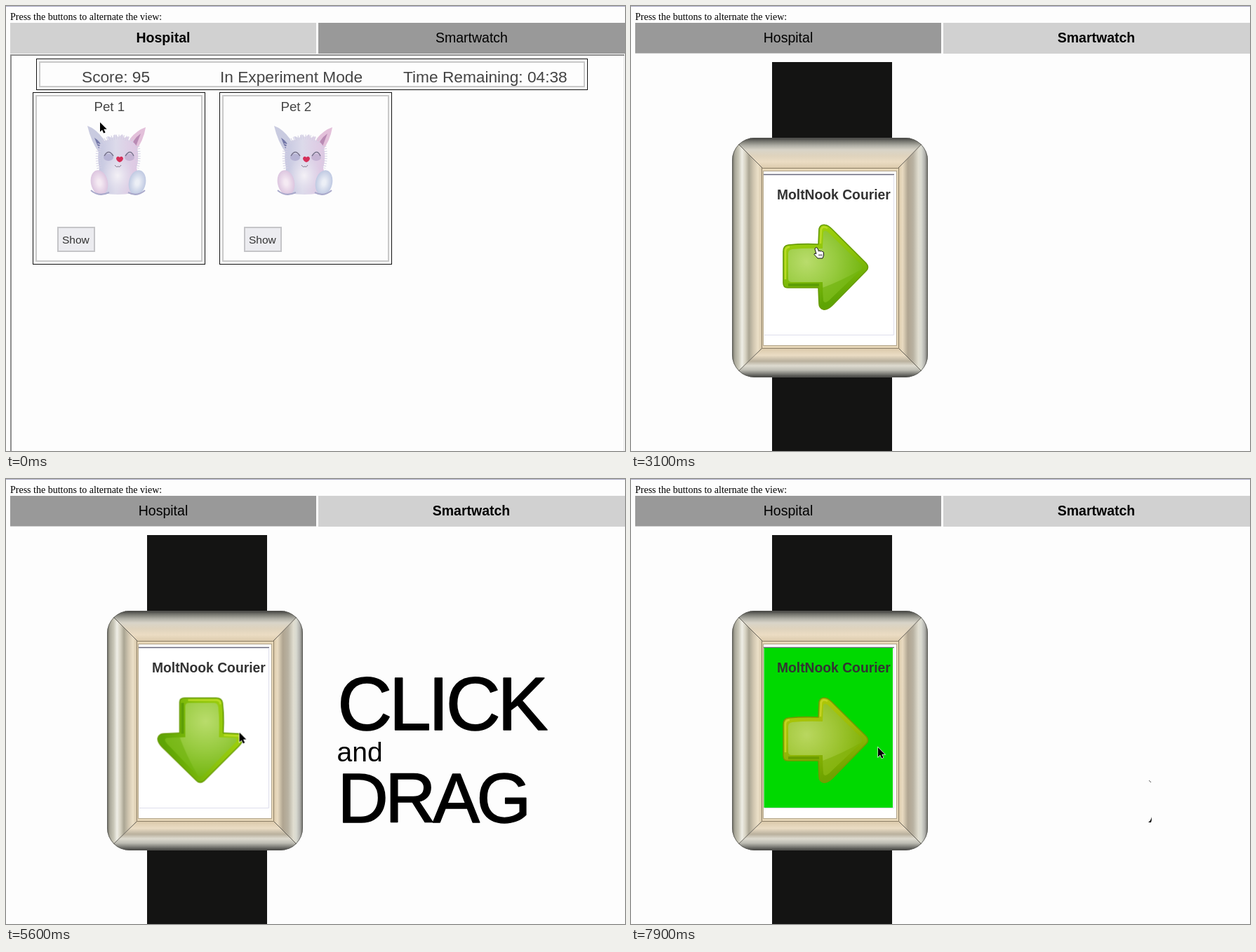
Animation of 882 by 635 pixels, one loop 8 s. Source, as an HTML page:

```html
<!DOCTYPE html>
<html lang="en">
<head>
<meta charset="utf-8">
<title>Pet hospital and smartwatch</title>
<style>
html, body { margin: 0; width: 100%; height: 100%; overflow: hidden; background: #fdfdfd; }
svg { display: block; width: 882px; height: 635px; }
text { font-family: "Liberation Sans", Arial, sans-serif; }
.intro { font: 14px "Liberation Serif", Times, serif; }
.tab { font-size: 19.5px; text-anchor: middle; }
.on { font-weight: bold; }
.info { font-size: 22.7px; fill: #444; }
.name { font-size: 18.7px; fill: #444; }
.show { font-size: 15.5px; fill: #333; }
.title { font-size: 19.3px; font-weight: bold; fill: #333; }
.big { stroke: #000; stroke-width: 1.5; stroke-linejoin: round; }
.click { font-size: 108px; letter-spacing: -4.5px; }
.drag { font-size: 100px; letter-spacing: -4.4px; }
.and { font-size: 39px; stroke: none; }

/* Hard changes */
.hospital, .watch, .t38, .t37, .t36, .big, .specks, .flash, .hand, .pointer, .arrow {
  animation: 8s step-end infinite;
}
.hospital { animation-name: hospital; }
.watch { animation-name: watch; }
.t38 { animation-name: t38; }
.t37 { animation-name: t37; }
.t36 { animation-name: t36; }
.big { animation-name: big; }
.specks { animation-name: specks; }
.flash { animation-name: flash; }
.hand { animation-name: hand; }
.pointer { animation-name: pointer; }
.arrow { animation-name: arrow; transform-origin: 277px 372.5px; }
@keyframes hospital { 0% { visibility: visible } 27.5%, 100% { visibility: hidden } }
@keyframes watch { 0% { visibility: hidden } 27.5%, 100% { visibility: visible } }
@keyframes t38 { 0% { opacity: 1 } 8.75%, 100% { opacity: 0 } }
@keyframes t37 { 0% { opacity: 0 } 8.75% { opacity: 1 } 21.25%, 100% { opacity: 0 } }
@keyframes t36 { 0% { opacity: 0 } 21.25%, 100% { opacity: 1 } }
@keyframes big { 0% { opacity: 0 } 50% { opacity: 1 } 95%, 100% { opacity: 0 } }
@keyframes specks { 0% { opacity: 0 } 95%, 100% { opacity: 1 } }
@keyframes flash {
  0%, 67.5%, 85% { opacity: 0 }
  65%, 82.5%, 97.5%, 100% { opacity: 1 }
}
@keyframes hand { 0% { opacity: 0 } 36.25% { opacity: 1 } 57.5%, 100% { opacity: 0 } }
@keyframes pointer { 0% { opacity: 1 } 36.25% { opacity: 0 } 57.5%, 100% { opacity: 1 } }
@keyframes arrow {
  0%, 85% { transform: none; filter: none }
  65% { transform: none; filter: hue-rotate(-12deg) opacity(.9) }
  67.5% { transform: rotate(90deg); filter: none }
  82.5% { transform: rotate(90deg); filter: hue-rotate(-12deg) opacity(.9) }
  97.5%, 100% { transform: none; filter: hue-rotate(-12deg) opacity(.9) }
}

/* Mouse path, sampled every 100 ms */
.cursor { animation: mouse 8s infinite; }
@keyframes mouse {
  0% { transform: translate(134px, 166px); animation-timing-function: step-end }
  3.75% { transform: translate(134px, 166px); animation-timing-function: steps(15) }
  22.5% { transform: translate(501px, 51px); animation-timing-function: steps(3) }
  26.25% { transform: translate(580px, 50px); animation-timing-function: step-end }
  27.5% { transform: translate(580px, 50px); animation-timing-function: steps(8) }
  37.5% { transform: translate(265px, 345px); animation-timing-function: step-end }
  57.5% { transform: translate(265px, 345px); animation-timing-function: steps(3) }
  61.25% { transform: translate(274px, 362px); animation-timing-function: steps(3) }
  65% { transform: translate(345px, 366px); animation-timing-function: step-end }
  68.75% { transform: translate(345px, 366px); animation-timing-function: steps(5) }
  75% { transform: translate(283px, 345px); animation-timing-function: step-end }
  77.5% { transform: translate(283px, 345px); animation-timing-function: steps(3) }
  81.25% { transform: translate(290px, 415px); animation-timing-function: steps(1) }
  82.5% { transform: translate(291px, 424px); animation-timing-function: steps(5) }
  88.75% { transform: translate(285px, 400px); animation-timing-function: steps(1) }
  90% { transform: translate(282px, 394px); animation-timing-function: steps(6) }
  97.5% { transform: translate(350px, 383px); animation-timing-function: steps(1) }
  98.75%, 100% { transform: translate(352px, 383px) }
}
</style>
</head>
<body>
<svg viewBox="0 0 882 635" xmlns="http://www.w3.org/2000/svg">
  <defs>
    <linearGradient id="fur">
      <stop offset="0" stop-color="#c3c5df"/><stop offset=".45" stop-color="#dcdaea"/><stop offset="1" stop-color="#dfc6e2"/>
    </linearGradient>
    <radialGradient id="belly">
      <stop offset="0" stop-color="#f4f1f6"/><stop offset="1" stop-color="#e2deed" stop-opacity="0"/>
    </radialGradient>
    <radialGradient id="footL"><stop offset=".2" stop-color="#f5eaf3"/><stop offset="1" stop-color="#dcc5df"/></radialGradient>
    <radialGradient id="footR"><stop offset=".2" stop-color="#eceff6"/><stop offset="1" stop-color="#bfc9e2"/></radialGradient>

    <linearGradient id="sideL">
      <stop offset="0" stop-color="#62625a"/><stop offset=".09" stop-color="#a9a799"/><stop offset=".22" stop-color="#c9c7b8"/>
      <stop offset=".33" stop-color="#efeee6"/><stop offset=".45" stop-color="#d5d0c0"/><stop offset=".56" stop-color="#aaa593"/>
      <stop offset=".72" stop-color="#d3c8b2"/><stop offset=".86" stop-color="#ece0c8"/><stop offset="1" stop-color="#d4c4a6"/>
    </linearGradient>
    <linearGradient id="sideR">
      <stop offset="0" stop-color="#d9c7a7"/><stop offset=".14" stop-color="#e9dbc1"/><stop offset=".32" stop-color="#b0a591"/>
      <stop offset=".5" stop-color="#b8b1a1"/><stop offset=".68" stop-color="#e0ddd0"/><stop offset=".78" stop-color="#d8d9d0"/>
      <stop offset=".9" stop-color="#b0b0ac"/><stop offset="1" stop-color="#666660"/>
    </linearGradient>
    <linearGradient id="sideT" x2="0" y2="1">
      <stop offset="0" stop-color="#3c3c3a"/><stop offset=".12" stop-color="#777770"/><stop offset=".26" stop-color="#b0afa6"/>
      <stop offset=".4" stop-color="#d8d4c8"/><stop offset=".6" stop-color="#dfd3bd"/><stop offset=".8" stop-color="#ebdcc3"/>
      <stop offset="1" stop-color="#dccbad"/>
    </linearGradient>
    <linearGradient id="sideB" x2="0" y2="1">
      <stop offset="0" stop-color="#dac8a9"/><stop offset=".25" stop-color="#eadcc4"/><stop offset=".45" stop-color="#b9b09d"/>
      <stop offset=".6" stop-color="#dedbd0"/><stop offset=".75" stop-color="#bdbcb3"/><stop offset=".88" stop-color="#7c7c76"/>
      <stop offset="1" stop-color="#3c3c3a"/>
    </linearGradient>
    <clipPath id="case"><rect x="144" y="188" width="279" height="342" rx="32"/></clipPath>

    <linearGradient id="rim" x2=".3" y2="1">
      <stop offset="0" stop-color="#a4d40a"/><stop offset=".5" stop-color="#8cc40c"/><stop offset="1" stop-color="#5ea404"/>
    </linearGradient>
    <radialGradient id="face" gradientUnits="userSpaceOnUse" cx="250" cy="365" r="82">
      <stop offset="0" stop-color="#b9dc6c"/><stop offset=".5" stop-color="#98cb40"/><stop offset="1" stop-color="#74b610"/>
    </radialGradient>

    <g id="pet">
      <rect x="38.5" y="123.5" width="245" height="245" fill="none" stroke="#111"/>
      <rect x="43" y="128" width="236" height="236" fill="none" stroke="#c9c9c9" stroke-width="2"/>
      <path d="M116 171Q128 175 139 190L145 205 133 210Q121 193 116 171Z" fill="#c9cbe0"/>
      <path d="M126 188Q136 194 138 205L132 203Z" fill="#7478a8"/>
      <path d="M199 173Q187 177 177 189L171 204 183 209Q196 193 199 173Z" fill="#e3c0da"/>
      <path d="M192 182Q179 191 178 205L184 203Z" fill="#b98bb4"/>
      <path d="M134 197Q140 191 146 191L144 186 152 188 155 183 160 187 166 183 168 188 175 186 174 191Q183 193 187 202 190 217 186 231 194 260 181 267 159 271 138 267 125 260 133 232 129 212 134 197Z" fill="url(#fur)"/>
      <path d="M134 197Q129 212 133 232M187 200Q190 217 186 231M138 194Q160 180 182 194" fill="none" stroke="#d3cfe3" stroke-width="7" stroke-dasharray="1 2.4"/>
      <ellipse cx="159" cy="242" rx="23" ry="27" fill="url(#belly)"/>
      <ellipse cx="133" cy="252" rx="12" ry="18" fill="url(#footL)" transform="rotate(-12 133 252)"/>
      <ellipse cx="187" cy="252" rx="12" ry="18" fill="url(#footR)" transform="rotate(12 187 252)"/>
      <path d="M121 263Q132 273 147 266M174 266Q187 273 198 263" fill="none" stroke="#a9a9cb" stroke-width="2"/>
      <ellipse cx="146" cy="216" rx="7" ry="5" fill="#b6b3d4"/>
      <ellipse cx="176" cy="216" rx="7" ry="5" fill="#c6b4d4"/>
      <path d="M140 214Q146 203 153 214M170 214Q177 203 182 214" fill="none" stroke="#77738c" stroke-width="1.4"/>
      <path d="M157 217Q159 213 162 216 165 213 167 217 167 221 162 223 157 221 157 217Z" fill="#d52f59"/>
      <path d="M155 227Q157 231 160 229 162 231 164 227" fill="none" stroke="#85798e"/>
      <rect x="74" y="316" width="52" height="34" fill="#ececf0" stroke="#c5c5c8" stroke-width="2"/>
      <text class="show" x="80" y="339">Show</text>
    </g>
  </defs>

  <rect width="882" height="635" fill="#fdfdfd"/>
  <path d="M0 .5H882" stroke="#a8a8c2"/>
  <text class="intro" x="6" y="20">Press the buttons to alternate the view:</text>

  <g class="hospital">
    <path d="M6 24H442V68H6Z" fill="#d1d1d1"/>
    <path d="M445 24H882V68H445Z" fill="#999"/>
    <text class="tab on" x="224" y="52">Hospital</text>
    <text class="tab" x="663.5" y="52">Smartwatch</text>
    <path d="M7 635V70H881" fill="none" stroke="#8f8f8f" stroke-width="2"/>
    <path d="M880.5 71V635" stroke="#e4e4e4"/>
    <rect x="43.5" y="75.5" width="785" height="44" fill="none" stroke="#111"/>
    <rect x="48" y="80" width="776" height="35" fill="none" stroke="#c9c9c9" stroke-width="2"/>
    <g class="info">
      <text x="108" y="109">Score: 95</text>
      <text x="305" y="109">In Experiment Mode</text>
      <text class="t38" x="566" y="109">Time Remaining: 04:38</text>
      <text class="t37" x="566" y="109">Time Remaining: 04:37</text>
      <text class="t36" x="566" y="109">Time Remaining: 04:36</text>
    </g>
    <use href="#pet"/>
    <use href="#pet" x="266"/>
    <text class="name" x="125.5" y="150">Pet 1</text>
    <text class="name" x="391.5" y="150">Pet 2</text>
  </g>

  <g class="watch">
    <path d="M6 24H442V68H6Z" fill="#999"/>
    <path d="M445 24H882V68H445Z" fill="#d1d1d1"/>
    <path d="M6 67.5H442" stroke="#c8c8c8"/>
    <text class="tab" x="224" y="52">Hospital</text>
    <text class="tab on" x="663" y="52">Smartwatch</text>

    <path d="M201 80H372V200H201ZM201 520H372V635H201Z" fill="#141413"/>
    <g clip-path="url(#case)">
      <path d="M144 188L187 231V488L144 530Z" fill="url(#sideL)"/>
      <path d="M423 188L381 231V488L423 530Z" fill="url(#sideR)"/>
      <path d="M144 188H423L381 231H187Z" fill="url(#sideT)"/>
      <path d="M144 530H423L381 488H187Z" fill="url(#sideB)"/>
      <path d="M144 188L187 231M423 188L381 231M144 530L187 488M423 530L381 488" stroke="#55524a" stroke-width=".9"/>
    </g>
    <rect x="144.5" y="188.5" width="278" height="341" rx="31.5" fill="none" stroke="#5a5a56" stroke-width=".8"/>
    <rect x="186.5" y="231.5" width="195" height="257" fill="#e6d6b8" stroke="#8d7f66"/>
    <rect x="188.5" y="235.5" width="190" height="249" fill="#fff" stroke="#b3a58b"/>
    <path d="M189 240.5H375" stroke="#68687c" stroke-width="1.5"/>
    <path d="M374.5 241V469.5H190" fill="none" stroke="#dedeec"/>
    <rect class="flash" x="189.5" y="241" width="183.5" height="228" fill="#00d900"/>
    <text class="title" x="208" y="276">MoltNook Courier</text>

    <g class="arrow" stroke-linejoin="round">
      <path d="M224 341Q245 339 267 340L268 318Q270 311 277 312.5 281 313 286 318L335 367Q340 373 335 378L287 427Q280 434 274 433 268 431 268 425L267 402H223Q217 402 217 395V350Q217 342 224 341Z" fill="url(#rim)" stroke="#679b04" stroke-width="1.6"/>
      <path d="M230 347Q250 345 273 346L274 323Q276 318 282 324L328 369Q331 372 328 376L282 420Q275 426 274 419L273 394H229Q224 394 224 389V353Q224 348 230 347Z" fill="url(#face)"/>
      <path d="M273 402Q300 392 328 376L282 420Q275 426 274 419Z" fill="#6fb20a" opacity=".6"/>
      <path d="M220 390V350Q220 344 226 344M270 339L271 319Q273 313 280 317" fill="none" stroke="#badb24" stroke-width="2.5"/>
      <path d="M224 398H268" stroke="#5d9e05" stroke-width="4"/>
    </g>

    <g class="specks">
      <path d="M738 430L741 433" stroke="#333" stroke-width=".8"/>
      <path d="M742 482Q741 487 737 490H741Q742 487 742 482Z"/>
    </g>
  </g>

  <g class="big">
    <text class="click" x="472.3" y="357.5">CLICK</text>
    <text class="and" x="471.5" y="403">and</text>
    <text class="drag" x="472.5" y="489.5">DRAG</text>
  </g>

  <g class="cursor">
    <path class="pointer" d="M0 0V13.5L3 10.7 5.2 15.5 7.6 14.4 5.4 9.8H9.7Z" stroke="#fff" stroke-width="1.2" paint-order="stroke"/>
    <g class="hand" stroke="#111" stroke-linejoin="round">
      <path d="M-2 0Q0 -1 1 1L2.5 5Q4 3.5 5 5 6.5 4 7.5 5.5 9 5 9.5 7V11L8 15H1L-4 9.5Q-4 7 -1 8.5L-3 2Q-3 .5 -2 0Z" fill="#fff"/>
      <path d="M3 9V12M5 9V12M7 9V12" stroke-width=".7"/>
    </g>
  </g>
</svg>
</body>
</html>
```
